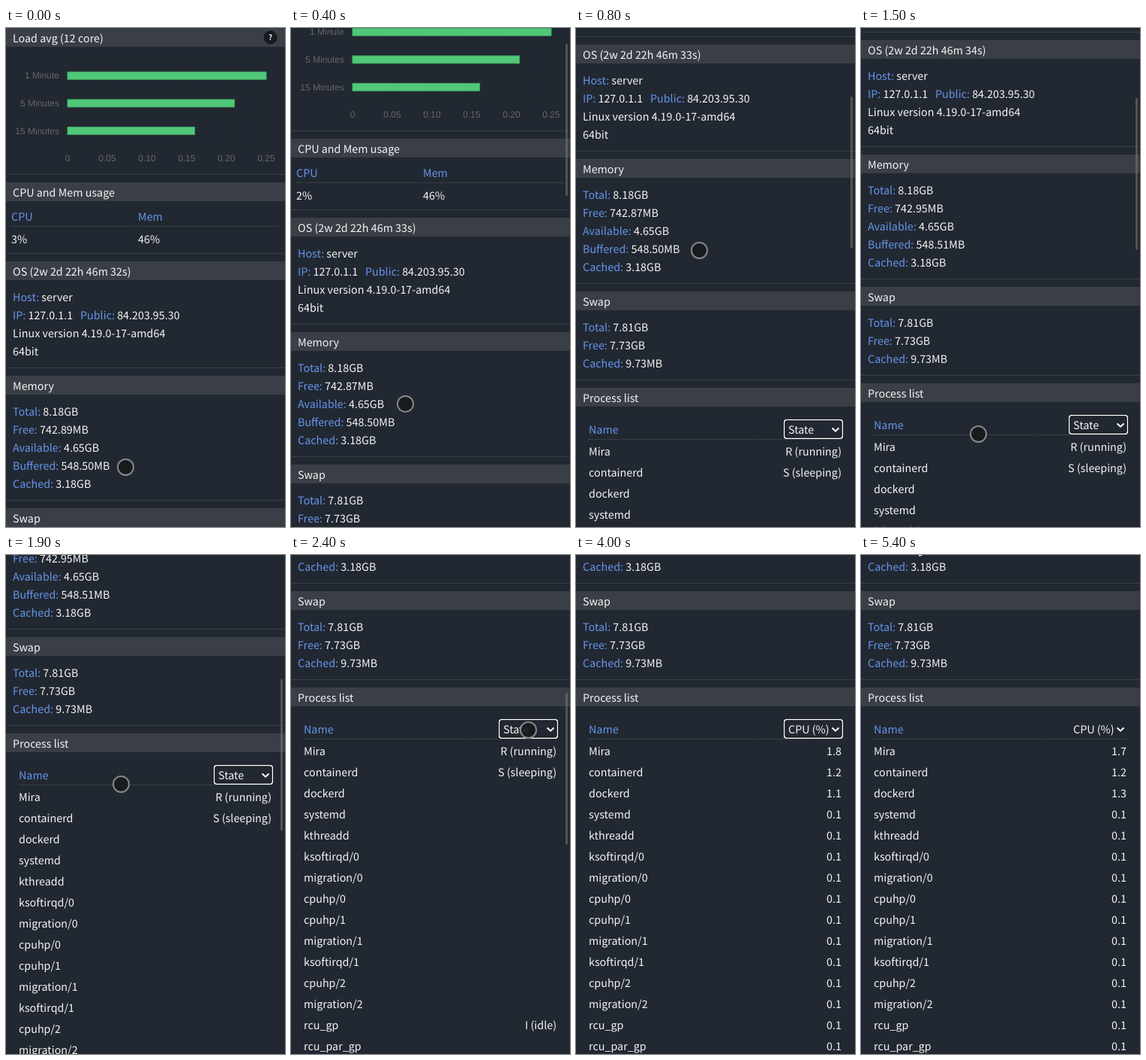
Write an HTML page that moves like this. It is 372 px wide and 663 px high and loops after 5.6 s.

```html
<!DOCTYPE html>
<html lang="en">
<head>
<meta charset="utf-8">
<title>Server monitor</title>
<style>
  html, body { margin: 0; width: 100%; height: 100%; overflow: hidden; background: #222831; }
  svg { display: block; width: 372px; height: 663px; }
  text {
    font: 14.33px "Noto Sans CJK JP", "Noto Sans CJK SC", "Noto Sans CJK", "Noto Sans", sans-serif;
    fill: #f4f4f4; text-rendering: geometricPrecision; white-space: pre;
  }
  .key { fill: #6495ed; }
  .axis { font: 12px "Liberation Sans", Arial, sans-serif; fill: #666; }
  .help { font: bold 10px "Noto Sans CJK JP", "Noto Sans", sans-serif; }
  .end { text-anchor: end; }
  .mid { text-anchor: middle; }
</style>
</head>
<body>
<svg id="stage" viewBox="0 0 372 663"></svg>
<script>
const LOOP = 5600, STEP = 100;
const BG = '#222831', BAND = '#3a3e46', RULE = '#3a3f47';
const stage = document.getElementById('stage');

function add(parent, tag, attrs, content) {
  const el = document.createElementNS('http://www.w3.org/2000/svg', tag);
  for (const k in attrs) el.setAttribute(k, attrs[k]);
  if (content !== undefined) el.textContent = content;
  parent.appendChild(el);
  return el;
}
const group = parent => add(parent, 'g', {});
const rect = (p, x, y, width, height, fill, more) =>
  add(p, 'rect', { x, y, width, height, fill, ...more });
// y is the middle of the text line
const label = (p, x, y, str, cls = '') => add(p, 'text', { x, y: y + 6, class: cls }, str);
const show = (el, on) => el.setAttribute('display', on ? 'inline' : 'none');
const move = (el, x, y) => el.setAttribute('transform', `translate(${x} ${y})`);
function put(el, str) { if (el.textContent !== str) el.textContent = str; }

rect(stage, 0, 0, 372, 663, BG);
const page = group(stage);

function section(top, title) {
  if (top) rect(page, 0, top - 11, 372, 1, RULE);
  rect(page, 0, top, 372, 25, BAND);
  return label(page, 9, top + 13, title);
}
// "key: value" lines, 24px apart; returns the value elements
function pairs(x, y, rows) {
  return Object.entries(rows).map(([key, value], i) => {
    const line = label(page, x, y + i * 24, '');
    add(line, 'tspan', { class: 'key' }, key + ': ');
    return add(line, 'tspan', {}, value);
  });
}

// Load chart
section(0, 'Load avg (12 core)');
add(page, 'circle', { cx: 352.5, cy: 12.5, r: 9, fill: '#16191e' });
add(page, 'text', { x: 352.5, y: 16.3, class: 'help mid' }, '?');
for (let i = 0; i < 6; i++) {
  const x = 82 + i * 53;
  rect(page, x - 0.5, 45, 1, 118, '#000', { opacity: 0.1 });
  add(page, 'text', { x, y: 177, class: 'axis mid' }, i ? (i * 0.05).toFixed(2) : '0');
}
for (let i = 0; i < 4; i++) rect(page, 74, Math.round(45 + i * 36.67), 273, 1, '#000', { opacity: 0.1 });
[['1 Minute', 0.25], ['5 Minutes', 0.21], ['15 Minutes', 0.16]].forEach(([name, load], i) => {
  const y = 63.3 + i * 36.67;
  add(page, 'text', { x: 71, y: y + 4, class: 'axis end' }, name);
  rect(page, 82, y - 5, load * 1060, 10, '#50c878', { stroke: '#42a865' });
});

// Usage table
section(205, 'CPU and Mem usage');
label(page, 7, 250, 'CPU', 'key');
label(page, 176, 250, 'Mem', 'key');
rect(page, 6, 263, 167, 1, RULE);
rect(page, 175, 263, 190, 1, RULE);
const cpu = label(page, 7, 280, '');
label(page, 176, 280, '46%');

const osTitle = section(310, '');
pairs(9, 357, { Host: 'server', IP: '127.0.1.1' });
pairs(99, 381, { Public: '84.203.95.30' });
label(page, 9, 405, 'Linux version 4.19.0-17-amd64');
label(page, 9, 429, '64bit');

section(462, 'Memory');
const [, free, , buffered] =
  pairs(9, 509, { Total: '8.18GB', Free: '', Available: '4.65GB', Buffered: '', Cached: '3.18GB' });

section(638, 'Swap');
pairs(9, 685, { Total: '7.81GB', Free: '7.73GB', Cached: '9.73MB' });

// Process table
section(766, 'Process list');
label(page, 17, 821, 'Name', 'key');
const rules = rect(page, 16, 834, 339, 1, RULE);
const gap = rect(page, 0, 834, 2, 1, BG);
const ring = group(page);
rect(ring, 277.75, 808.75, 77.5, 24.5, BG, { rx: 3, stroke: '#fff', 'stroke-width': 1.5 });
rect(ring, 279, 810, 75, 22, 'none', { rx: 2, stroke: '#101010' });
const picked = label(page, 283, 821, '');
add(page, 'path', { d: 'M341.5 819.5l4.5 4.2l4.5 -4.2', fill: 'none', stroke: '#fff', 'stroke-width': 2 });

const names = ['Mira', 'containerd', 'dockerd', 'systemd', 'kthreadd', 'ksoftirqd/0', 'migration/0',
  'cpuhp/0', 'cpuhp/1', 'migration/1', 'ksoftirqd/1', 'cpuhp/2', 'migration/2', 'rcu_gp', 'rcu_par_gp'];
const states = { Mira: 'R (running)', containerd: 'S (sleeping)', rcu_gp: 'I (idle)' };
const cells = names.map((name, i) => {
  label(page, 17, 850 + i * 28, name);
  return label(page, 354, 850 + i * 28, '', 'end');
});

const thumb = rect(stage, 366, 0, 3, 202, '#808080', { rx: 1.5, opacity: 0.5 });

// Drop-down list
const menu = group(stage);
rect(menu, 279.5, 242.5, 74, 161, BG, { stroke: '#85888c' });
const hover = rect(menu, 280, 243, 73, 32, '#29607a');
['State', 'PID', 'CPU (%)', 'MEM', 'Uptime'].forEach((s, i) => label(menu, 284, 259 + i * 32, s));

const touch = add(stage, 'circle', { cx: 0.5, cy: 0.5, r: 10.5, fill: '#16191d', 'fill-opacity': 0.9,
  stroke: '#85878a', 'stroke-width': 2 });
const arrow = add(stage, 'path', {
  d: 'M1 1V24.5L6.4 19.6L10 28.5L14 26.8L10.3 18.4H18Z',
  fill: '#111', stroke: '#fff', 'stroke-width': 1.4, 'stroke-linejoin': 'round'
});

// Motion
const linear = p => p;
const easeIn = p => p * p;
const easeOut = p => 1 - (1 - p) ** 2;
const smooth = p => p * p * (3 - 2 * p);
const fling = p => 1 - (1 - p) ** 2.69;
const part = (t, from, to) => Math.min(1, Math.max(0, (t - from) / (to - from)));

// Two swipes
const scrollAt = t => Math.round(294 * smooth(part(t, 219, 853)) + 296 * fling(part(t, 1500, 2400)));

// Each stop: time, x, y, easing on the way there
const touchPath = [[0, 159, 583], [400, 152, 499, easeIn], [800, 164, 295, easeOut],
  [1300, 157, 548, smooth], [1500, 156, 539, easeIn], [1900, 153, 304, linear], [2400, 316, 232, smooth]];
const arrowPath = [[2700, 318, 224], [3200, 305, 299, smooth], [3300, 306, 315, linear],
  [3400, 306, 315, linear], [3900, 83, -8, smooth], [4000, 66, -60, linear],
  [4200, 66, -60, linear], [4300, 68, -27.5, linear]];

function along(path, t) {
  let [, x, y] = path[0];
  for (let i = 1; i < path.length; i++) {
    const [end, nx, ny, ease] = path[i];
    const p = ease(part(t, path[i - 1][0], end));
    x += (nx - x) * p;
    y += (ny - y) * p;
  }
  return [x, y];
}

function render(t) {
  const top = scrollAt(t);
  const byCpu = t >= 3400;
  const tick = t < 200 ? 0 : t < 1200 ? 1 : 2;

  move(page, 0, -top);
  thumb.setAttribute('y', 3.4 + top * 0.304);
  show(thumb, t >= 200 && t < 2600);

  put(cpu, tick ? '2%' : '3%');
  put(osTitle, `OS (2w 2d 22h 46m ${32 + tick}s)`);
  put(free, ['742.89MB', '742.87MB', '742.95MB'][tick]);
  put(buffered, tick < 2 ? '548.50MB' : '548.51MB');

  show(ring, t < 2600 || (byCpu && t < 5400));
  put(picked, byCpu ? 'CPU (%)' : 'State');
  gap.setAttribute('x', byCpu ? 240 : 236);
  const busy = t >= 5200 ? ['1.7', '1.2', '1.3'] : ['1.8', '1.2', '1.1'];
  cells.forEach((cell, i) => put(cell, byCpu ? busy[i] || '0.1' : states[names[i]] || ''));

  const [ax, ay] = along(arrowPath, t);
  show(menu, t >= 2600 && !byCpu);
  hover.setAttribute('y', 243 + 32 * Math.max(0, Math.floor((ay - 243) / 32)));
  show(arrow, t >= 2600);
  move(arrow, ax, ay);
  show(touch, t < 2600);
  move(touch, ...along(touchPath, t));
}

const start = performance.now();
function loop() {
  const t = (performance.now() - start) % LOOP;
  render(Math.floor(t / STEP) * STEP);
  requestAnimationFrame(loop);
}
loop();
</script>
</body>
</html>
```
